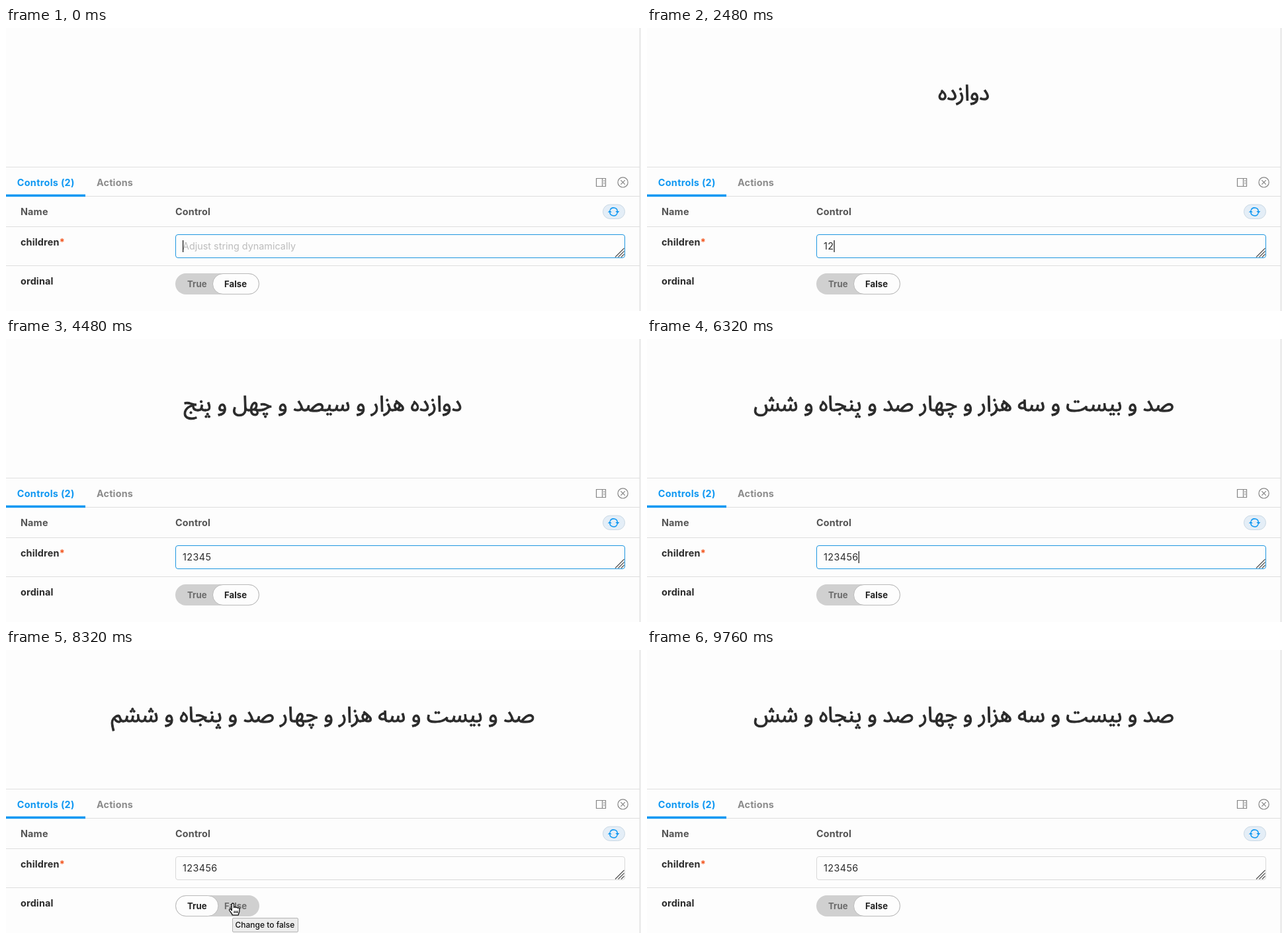
An HTML page for the animation above (9.84 s loop, 960 px wide and 428 px high).

```html
<!DOCTYPE html>
<html lang="en">
<head>
<meta charset="utf-8">
<title>Number words</title>
<style>
  html, body { margin: 0; width: 100%; height: 100%; overflow: hidden; background: #fdfdfd; }
  svg { display: block; width: 960px; height: 428px; }
  text { font-family: Inter, "Open Sans", sans-serif; font-size: 14.4px; white-space: pre; }
  .b { font-weight: 700; letter-spacing: .15px; }
  .toggle { font-weight: 700; font-size: 13.2px; }
  #value { letter-spacing: .4px; }
  #head { font-family: "Noto Sans Arabic", Vazirmatn, "DejaVu Sans", sans-serif; font-weight: 500; font-size: 32px; }
  .line { stroke: #dedede; }
  .icon { fill: none; stroke: #858585; stroke-width: 1.2; }
</style>
</head>
<body>
<svg viewBox="0 0 960 428">
  <rect width="960" height="428" fill="#fdfdfd"/>
  <path d="M958.5 0V428" stroke="#e2e2e2" stroke-width="1.6"/>
  <text id="head" x="479" y="109" text-anchor="middle" direction="rtl" fill="#2b2b2b" stroke="#2b2b2b"></text>

  <path class="line" d="M0 210.3H958M0 254.5H958M0 300.5H958M0 359.5H958"/>
  <rect y="251.6" width="120" height="3.6" fill="#1098f2"/>
  <text class="b" x="16.8" y="238.5" style="letter-spacing:.3px" fill="#1098f2">Controls (2)</text>
  <text class="b" x="137" y="238.5" fill="#8c8c8c">Actions</text>
  <g class="icon">
    <path d="M892.5 227.5h14v12h-14zM901.5 227.5v12M903.2 230.5h2M903.2 233h2M903.2 235.5h2"/>
    <circle cx="932.6" cy="233.4" r="7.6"/>
    <path d="M929.4 230.2l6.4 6.4M935.8 230.2l-6.4 6.4"/>
  </g>

  <text class="b" x="22" y="283.3" fill="#555">Name</text>
  <text class="b" x="256" y="283.3" fill="#555">Control</text>
  <rect x="902.5" y="267" width="33" height="21.5" rx="10.75" fill="#e4eef7" stroke="#cbd9e4"/>
  <g fill="none" stroke="#1098f2" stroke-width="1.5">
    <path d="M913.2 275.6a5.8 5.8 0 0 1 11.2 2M924 280.2a5.8 5.8 0 0 1-11.2-2"/>
    <path d="M921.4 277h6l-3 3.4zM915.8 278.8h-6l3-3.4z" fill="#1098f2" stroke="none"/>
  </g>

  <text class="b" x="22" y="328.6" fill="#2b2b2b">children</text>
  <text class="b" x="80.8" y="328.6" fill="#f2561f">*</text>
  <rect id="field" x="256.5" y="312.5" width="679" height="35" rx="3.5" fill="#fdfdfd"/>
  <path d="M921 346.5l13.5-13.5M925.5 346.5l9-9M930 346.5l4.5-4.5" stroke="#555" stroke-width="1.2"/>
  <text id="hint" x="267" y="335.3" font-size="14.2" fill="#bcbcbc">Adjust string dynamically</text>
  <text id="value" x="267" y="335.3" fill="#2b2b2b"></text>
  <rect id="caret" y="321" width="1.2" height="18" fill="#111"/>

  <text class="b" x="22" y="388" fill="#2b2b2b">ordinal</text>
  <rect x="256" y="371" width="127" height="32" rx="16" fill="#d0d0d0"/>
  <rect id="knob" y="371.5" height="31" rx="15.5" fill="#fdfdfd" stroke="#b9b9b9"/>
  <text id="yes" class="toggle" x="274" y="392">True</text>
  <text id="no" class="toggle" x="330" y="392">False</text>

  <g id="tip">
    <rect x="342.5" y="405.5" width="99" height="21" rx="1.5" fill="#ececec" stroke="#b5b5b5"/>
    <text x="346.5" y="420.3" style="font-size:12px;font-weight:500" fill="#111">Change to false</text>
  </g>
  <path id="hand" fill="#fff" stroke="#111" stroke-width="1.3" stroke-linejoin="round"
    d="M-1.7 11V1.6a1.6 1.6 0 0 1 3.2 0V6.5c.3-1.4 2.8-1.3 3 .2c.5-1 2.6-.8 2.8.6c.6-.9 2.6-.5 2.6 1.2V12c0 2-1.4 3-1.6 5.8H-.8C-1.2 15.5-3.5 13.5-5.2 11c-1-1.8 1-3 2.2-1.8zM2.2 11.5v3.6M4.6 11.5v3.6M7 11.5v3.6"/>
  <path id="arrow" fill="#111" stroke="#fff" stroke-width="1"
    d="M0 0V14.5l3.4-3.2 2.3 5.3 2.3-1-2.3-5.1H10.3z"/>
</svg>
<script>
const LOOP = 9840, STEP = 80;
const $ = id => document.getElementById(id);
const [head, field, hint, value, caret, knob, yes, no, tip, hand, arrow] =
  ['head', 'field', 'hint', 'value', 'caret', 'knob', 'yes', 'no', 'tip', 'hand', 'arrow'].map($);

const words = ['', 'یک', 'دوازده', 'صد و بیست و سه', 'هزار و دویست و سی و چهار',
  'دوازده هزار و سیصد و چهل و پنج', 'صد و بیست و سه هزار و چهار صد و پنجاه و شش'];
const keys = [880, 1760, 2640, 3600, 4480, 5840];
const blur = 7040, on = 7120, off = 8640;

// pointer stops: time, x, y of the tip
const route = [[6480, 303, 424], [6880, 286, 379], [7520, 286, 379],
  [7920, 343, 383], [8720, 343, 383], [9040, 352, 432]];

const show = (el, visible) => el.setAttribute('visibility', visible ? 'visible' : 'hidden');
const set = (el, attrs) => { for (const k in attrs) el.setAttribute(k, attrs[k]); };
const put = (el, s) => { if (el.textContent !== s) el.textContent = s; };
const mix = (a, b, k) => a + (b - a) * k;
const ease = k => k * k * (3 - 2 * k);

// pick the heading size whose longest line fills the column
put(head, words[6]);
head.style.fontSize = 32 * 636 / head.getComputedTextLength() + 'px';

function pointer(t) {
  const i = route.findIndex(p => p[0] > t);
  if (i < 1) return null;
  const [a, b] = [route[i - 1], route[i]];
  const k = ease((t - a[0]) / (b[0] - a[0]));
  return [mix(a[1], b[1], k), mix(a[2], b[2], k)];
}

function caretOn(t, typed) {
  if (t >= blur) return false;
  if (!typed) return t < 400;
  return Math.floor((t - keys[typed - 1]) / 480) % 2 === 1;
}

function draw(now) {
  const t = Math.floor(now % LOOP / STEP) * STEP;
  const typed = keys.filter(k => t >= k).length;
  const ordinal = t >= on && t < off;

  put(head, words[typed] + (ordinal ? 'م' : ''));
  put(value, '123456'.slice(0, typed));
  show(hint, !typed);
  field.setAttribute('stroke', t < blur ? '#1f97e0' : '#d9d9d9');
  caret.setAttribute('x', 267 + (typed ? value.getComputedTextLength() : 0));
  show(caret, caretOn(t, typed));

  set(knob, ordinal ? { x: 256.5, width: 64.5 } : { x: 312.5, width: 70 });
  yes.setAttribute('fill', ordinal ? '#222' : '#6b6b6b');
  no.setAttribute('fill', ordinal ? '#6b6b6b' : '#222');
  show(tip, t >= 8320 && t < 8560);

  const p = pointer(t), over = p && p[1] < 403;
  show(hand, over);
  show(arrow, p && !over);
  if (p) for (const el of [hand, arrow]) el.setAttribute('transform', `translate(${p[0]} ${p[1]})`);
}

const start = performance.now();
(function tick() {
  draw(performance.now() - start);
  requestAnimationFrame(tick);
})();
</script>
</body>
</html>
```
